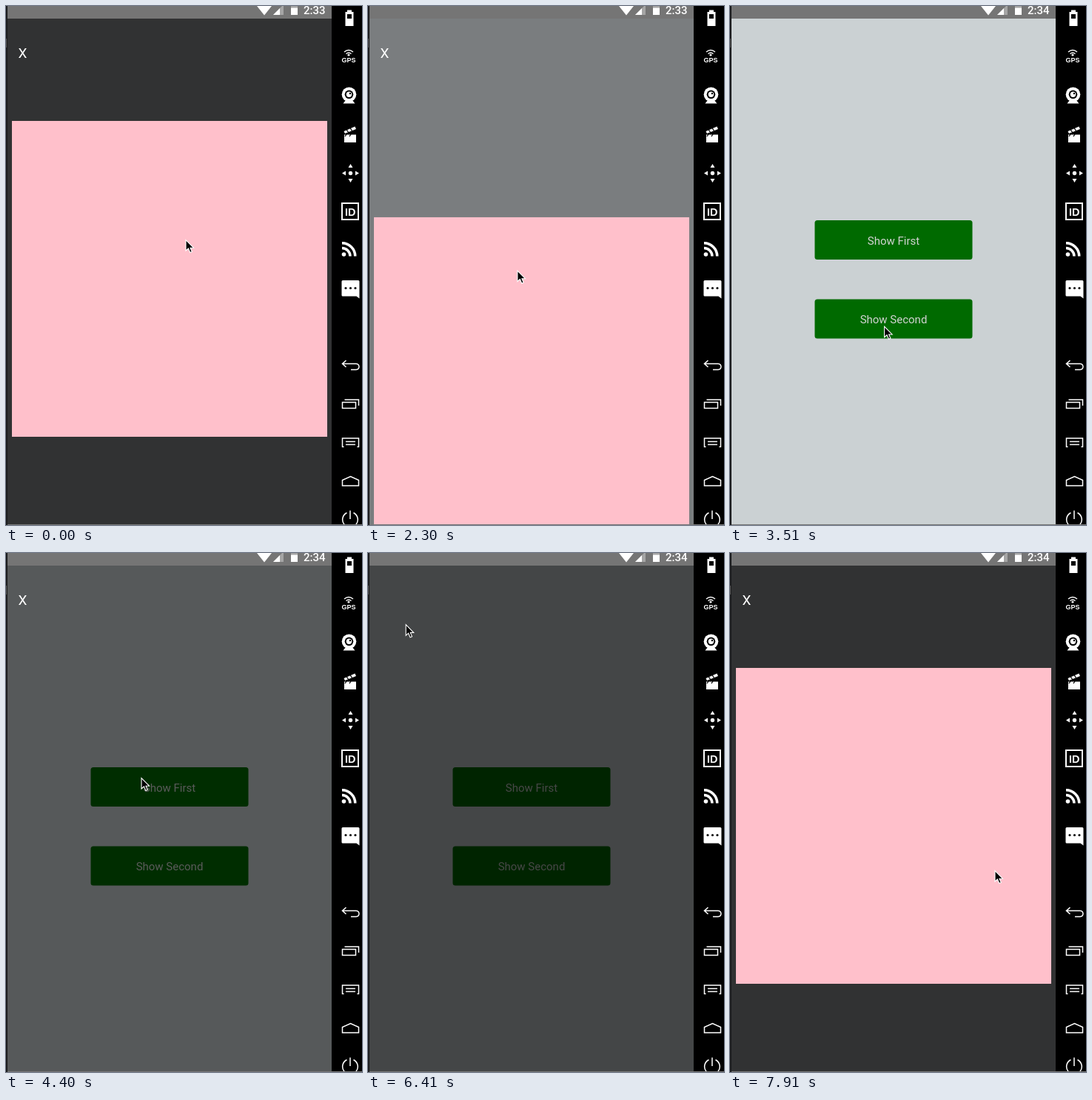
These frames come from a looping animation (481x700 px, 8 s). An HTML page:

```html
<!DOCTYPE html>
<html lang="en">
<head>
<meta charset="utf-8">
<title>Swipe to dismiss modal</title>
<style>
  html, body { margin: 0; width: 100%; height: 100%; overflow: hidden; background: #000; }
  svg { display: block; width: 481px; height: 700px; }
  text { font-family: Roboto, sans-serif; fill: #fff; }
  .label { font-size: 15px; text-anchor: middle; }
  .bold { font-family: "Liberation Sans", Arial, sans-serif; font-weight: 700; text-anchor: middle; }
  .line { fill: none; stroke: #fff; stroke-width: 1.5; }
</style>
</head>
<body>
<svg viewBox="0 0 481 700">
  <defs><clipPath id="screen"><rect x="2" y="17" width="438" height="682"/></clipPath></defs>
  <rect width="481" height="700" fill="#000"/>
  <rect width="2" height="700" fill="#1b1c1e"/>
  <rect y="44" width="1" height="12" fill="#555"/>

  <g clip-path="url(#screen)">
    <rect x="2" y="17" width="438" height="682" fill="#f5fcff"/>
    <g fill="green">
      <rect x="114.5" y="289" width="213" height="53" rx="3.5"/>
      <rect x="114.5" y="395.5" width="213" height="53" rx="3.5"/>
    </g>
    <text class="label" x="221" y="322">Show First</text>
    <text class="label" x="221" y="428">Show Second</text>
    <rect id="backdrop" x="2" y="17" width="438" height="682"/>
    <text id="close" x="16.6" y="70" font-size="19">X</text>
    <rect id="card" x="8" y="155" width="426" height="426" fill="pink"/>
  </g>

  <!-- status bar -->
  <rect x="2" width="438" height="17" fill="#757575"/>
  <path d="M339 0H359L349 12.5Z" fill="#fff"/>
  <path d="M375 0V12H361L373 0Z" fill="#fff" opacity=".35"/>
  <path d="M361 12L370 3V12Z" fill="#fff"/>
  <rect x="385" width="9" height="12" fill="#fff" opacity=".35"/>
  <rect x="385" y="2.5" width="9" height="9.5" fill="#fff"/>
  <text id="clock" x="402" y="11" font-size="15" font-weight="500">2:33</text>

  <!-- emulator toolbar -->
  <rect x="440" width="41" height="700" fill="#000"/>
  <g fill="#fff">
    <path d="M461 5.5H467V8H469.5V27H458.5V8H461ZM461 11V17H467V11Z" fill-rule="evenodd"/>

    <circle cx="463" cy="66" r="1.6"/>
    <path class="line" d="M459.5 64.5Q463 61.5 466.5 64.5M457 62Q463 57 469 62"/>
    <text class="bold" x="463" y="76.3" font-size="9">GPS</text>

    <circle cx="463.5" cy="119.3" r="9.8"/>
    <circle cx="463.5" cy="119.3" r="5.8" fill="#000"/>
    <circle cx="463.5" cy="119.3" r="3.7"/>
    <circle cx="465" cy="118" r="1.2" fill="#000"/>
    <path d="M459 127H468L471.5 131.5H455.5Z"/>

    <path d="M457 173.5H473V184H457ZM456.500 169L471.5 162.500L473 166L458 172Z"/>
    <path d="M460 166.5L463 171M465 164.5L468 169M460 173L458 176M466 173L464 176" stroke="#000" stroke-width="1.3"/>

    <circle cx="465.5" cy="225.5" r="2.7"/>
    <path d="M462.5 218L465.5 213L468.5 218ZM462.5 233L465.5 238L468.5 233ZM459 222.5L454 225.5L459 228.5ZM472 222.5L477 225.5L472 228.5Z"/>

    <rect x="454" y="266" width="22" height="22" fill="none" stroke="#fff" stroke-width="2"/>
    <text class="bold" x="465.2" y="282.5" font-size="14.5">ID</text>

    <circle cx="456.5" cy="335" r="2.8"/>
    <path d="M454 326.5A11 11 0 0 1 465 337.5M454 319.7A17.8 17.8 0 0 1 471.8 337.500" fill="none" stroke="#fff" stroke-width="3.5"/>

    <path d="M455 370H476Q477.5 370 477.5 371.5V394.5L473.5 391.5H455Q453.5 391.500 453.5 390V371.5Q453.5 370 455 370Z"/>
    <path d="M459 380.5H473" stroke="#000" stroke-width="3.2" stroke-linecap="round" stroke-dasharray="0 6.5"/>
  </g>
  <g class="line">
    <path d="M459.5 478L454.5 482.5L459.5 487M454.5 482.5H473Q477 483 477 486.5T473 490.5H466"/>
    <path d="M454.5 534.5H472.5V542.5H454.5ZM457.5 531H476.5V539"/>
    <path d="M456.5 594.5H454.5V583H476.5V594.5H474.5M459 587.5H472M459 591.5H472"/>
    <path d="M454.5 647V639.5L465.5 634.5L476.5 639.5V647Z"/>
    <path d="M460.5 683.5A10.3 10.3 0 1 0 469.5 683.5M465 680.5V692"/>
  </g>
  <rect x="2" y="699" width="479" height="1" fill="#777"/>

  <path id="cursor" d="M0 0V14.5L3.4 11.5L5.8 17L8.3 16L6 10.7H10.5Z" fill="#000" stroke="#fff" stroke-width="1.1"/>
</svg>
<script>
  const LOOP = 8000, STEP = 87.9, LEAD = 15;
  const OFFSCREEN = 560;      // card travel when dismissed
  const DIM = 0.8;            // backdrop strength at rest
  const DIM_PER_PX = 0.00228; // backdrop lost per dragged pixel
  const FADE_DELAY = 420, FADE_OUT = 270, SLIDE_IN = 200, SLIDE_OUT = 180;

  const sessions = [
    { open: -900, lit: -600, slide: -500, close: 2900 },
    { open: 4310, lit: 4415, slide: 4747, close: 5970 },
    { open: 6945, lit: 7181, slide: 7472, close: Infinity }
  ];

  const moves = [
    { from: 90, to: 350, x: 194, y: 159 },
    { from: 540, to: 875, x: 190, y: 168 },
    { from: 970, to: 1400, x: 191, y: 275.5 },
    { from: 1950, to: 2810, x: 219, y: 484.5 },
    { from: 3340, to: 3950, x: 183, y: 303.5 },
    { from: 4750, to: 5445, x: 20, y: 67 },
    { from: 5980, to: 6150, x: 46.5, y: 91 },
    { from: 6410, to: 6670, x: 229, y: 312.5 },
    { from: 7480, to: 7900, x: 358, y: 428.5 }
  ];

  const $ = id => document.getElementById(id);
  const ramp = (t, from, to) => Math.min(1, Math.max(0, (t - from) / (to - from)));

  function pointer(t) {
    let x = 243, y = 315.5;
    for (const move of moves) {
      const p = ramp(t, move.from, move.to);
      x += (move.x - x) * p;
      y += (move.y - y) * p;
    }
    return [x, y];
  }

  // A short pull that snaps back, then a long one that swings and ends in a dismissal.
  function dragged(t) {
    if (t < 1750) return 55 * ramp(t, 970, 1400);
    if (t > 4000) return 0;
    return 130 * Math.sin(Math.PI * ramp(t, 2000, 2560)) + 77.5 * ramp(t, 2560, 2810);
  }

  function draw(now) {
    const t = Math.floor((now % LOOP + LEAD) / STEP) * STEP;
    const { open, lit, slide, close } = sessions.filter(s => t >= s.open).pop();
    const pull = dragged(t);
    const fadeStart = close + FADE_DELAY;
    const fade = ramp(t, open, lit) * (t < fadeStart ? 1 : 1 - (t - fadeStart) / FADE_OUT);
    const entering = (1 - ramp(t, slide, slide + SLIDE_IN)) ** 3;
    const leaving = t < close ? 0 : ramp(t, close, close + SLIDE_OUT) ** 3;

    $('card').setAttribute('transform', `translate(0 ${pull + OFFSCREEN * (entering + leaving)})`);
    $('backdrop').setAttribute('opacity', Math.max(0, fade * (DIM - DIM_PER_PX * pull)));
    $('close').setAttribute('visibility', t < close ? 'visible' : 'hidden');
    $('clock').textContent = t < 2450 ? '2:33' : '2:34';
    $('cursor').setAttribute('transform', `translate(${pointer(t)})`);
  }

  const start = performance.now();
  function frame() {
    draw(performance.now() - start);
    requestAnimationFrame(frame);
  }
  frame();
</script>
</body>
</html>
```
